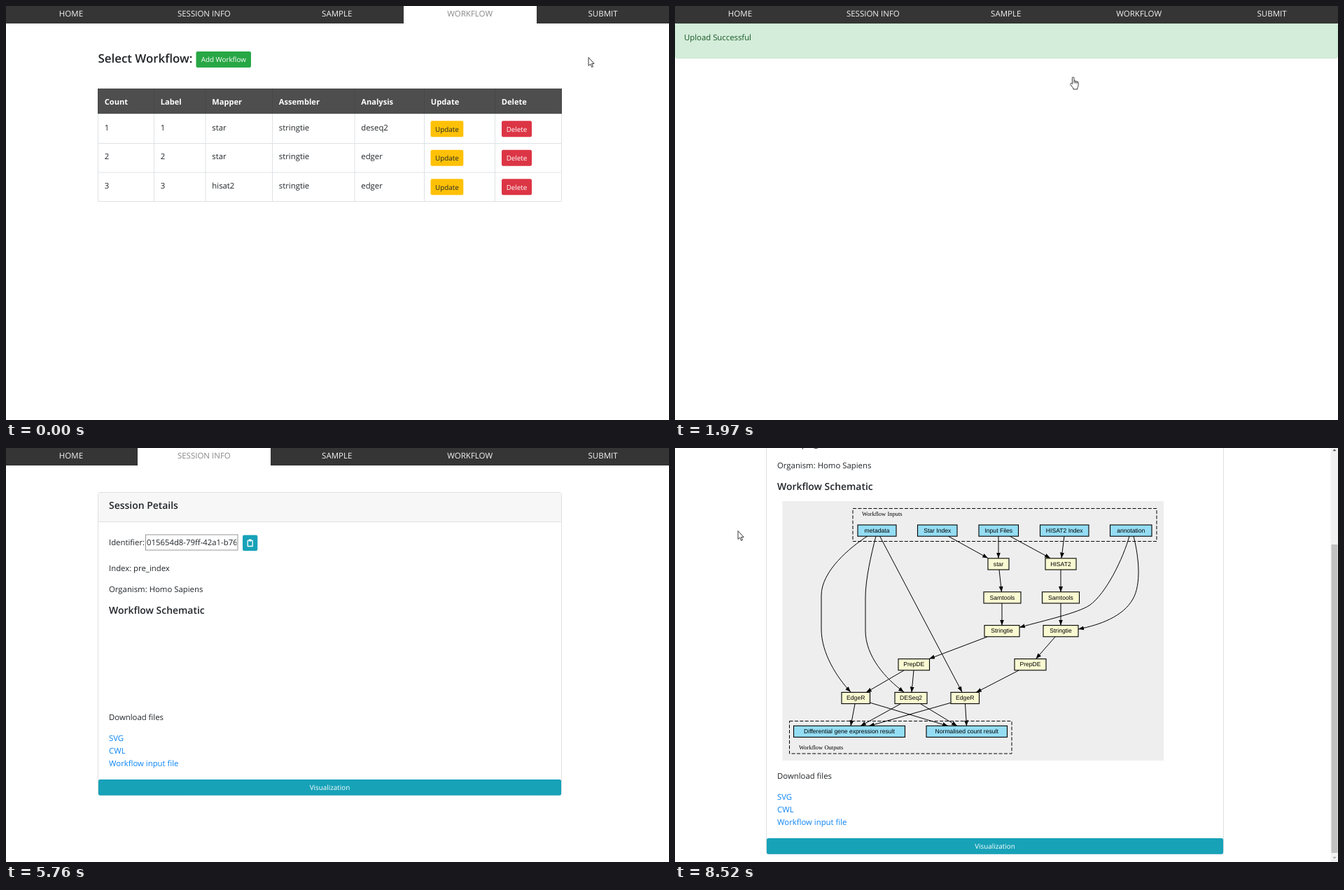
An HTML page that plays this animation: 947 by 592 pixels, repeating every 9210 ms.

```html
<!DOCTYPE html>
<html lang="en">
<head>
<meta charset="utf-8">
<title>Workflow session</title>
<style>
html, body { margin: 0; width: 100%; height: 100%; overflow: hidden; background: #fff; }
svg { display: block; }
#stage { width: 947px; height: 592px; }
text { font: 11.35px "Open Sans", "Noto Sans", sans-serif; fill: #212529; white-space: pre; text-rendering: geometricPrecision; }
.mid { text-anchor: middle; }
.caps { font-size: 11.5px; fill: #f4f4f4; }
.on { fill: #888; }
.white { fill: #fff; }
.small { font-size: 9.85px; }
.bold { font-size: 11.1px; font-weight: 700; }
.h3 { font-size: 19.6px; font-weight: 600; }
.h4 { font-size: 16.9px; font-weight: 600; }
.h5 { font-size: 13.95px; font-weight: 600; }
.link { fill: #0a84f5; }
.ok { fill: #155724; }
.node { font: 8.6px "Liberation Sans", Arial, sans-serif; fill: #000; }
.serif { font: 8.5px "Liberation Serif", Times, serif; fill: #000; }
.edges { fill: none; stroke: #000; stroke-width: 1; }
.page { display: none; }
</style>
</head>
<body>
<svg id="stage" viewBox="0 0 947 592" xmlns="http://www.w3.org/2000/svg">
  <defs>
    <marker id="tip" markerUnits="userSpaceOnUse" markerWidth="9" markerHeight="7" refX="8" refY="3" orient="auto">
      <path d="M0 0L8 3L0 6Z"/>
    </marker>
  </defs>
  <g id="pages"></g>
  <g id="cursor">
    <path id="arrow" d="M.5 .5V12.4L3.2 10L5.2 14.4L7 13.6L5.1 9.4H8.6Z" fill="#fff" stroke="#222" stroke-width=".9"/>
    <path id="hand" d="M3.4 10.6V2.2Q3.5 .6 4.7 .6T6 2.2V6.2Q7.2 5.4 8.2 6.6Q9.4 6 10.2 7.2Q12 6.8 12.1 8.6V12.2Q12 14.6 10.8 16V18H4.8V16.4L1 11.6Q.2 10 1.4 9.6T3.4 10.6M6 6.2V9.4M8.2 6.8V9.6M10.2 7.3V9.8" fill="#fff" stroke="#222" stroke-width=".9"/>
  </g>
</svg>
<script>
const LOOP = 9210, FULL = 947, NARROW = 936.5, ALERT = 48.7, MAX_SCROLL = 177, GRAPH_H = 261;
const $ = id => document.getElementById(id);

const text = (x, y, s, cls = '') => `<text x="${x}" y="${y}" class="${cls}">${s}</text>`;
const rect = (x, y, x2, y2, fill, more = '') =>
  `<rect x="${x}" y="${y}" width="${x2 - x}" height="${y2 - y}" fill="${fill}" ${more}/>`;
const button = (x, y, x2, y2, fill, label, cls = 'white') =>
  rect(x, y, x2, y2, fill, 'rx="2.2"') + text((x + x2) / 2, y + 15.3, label, 'small mid ' + cls);
const page = (id, body) => `<g class="page" id="${id}">${body}</g>`;

function nav(active, width = FULL) {
  const step = (width + 2.5) / 5;
  return rect(0, 0, width, 25, '#353535') +
    ['HOME', 'SESSION INFO', 'SAMPLE', 'WORKFLOW', 'SUBMIT'].map((name, i) => {
      const x = i * step - 2, on = i === active;
      return (on ? rect(Math.round(x), 0, Math.min(width, Math.round(x + step)), 25, '#fff') : '') +
        text(x + step / 2, 15, name, 'mid caps' + (on ? ' on' : ''));
    }).join('');
}

const notice = (width = FULL) =>
  rect(.5, 25.5, width - .5, 74.5, '#d4edda', 'stroke="#c3e6cb" rx="2.5"') +
  text(13, 49, 'Upload Successful', 'ok');

function workflows() {
  const cols = [131.5, 211.5, 285, 380.5, 498, 597.5, 698.5, 793.5];
  const rows = [118, 154.5, 196.5, 238, 279.5];
  const heads = ['Count', 'Label', 'Mapper', 'Assembler', 'Analysis', 'Update', 'Delete'];
  const data = [['1', '1', 'star', 'stringtie', 'deseq2'],
                ['2', '2', 'star', 'stringtie', 'edger'],
                ['3', '3', 'hisat2', 'stringtie', 'edger']];
  const lines = rows.slice(1).map(y => `M131.5 ${y}H793.5`).join('') +
    cols.map(x => `M${x} 154.5V279.5`).join('');
  return nav(3) + text(131.5, 80.5, 'Select Workflow:', 'h4') +
    button(271.5, 65, 350, 88, '#28a745', 'Add Workflow') +
    rect(131.5, 118, 793.5, 154.5, '#4e4e4e') +
    `<path d="${cols.map(x => `M${x} 118V154.5`).join('')}" stroke="#464646"/>` +
    `<path d="${lines}" stroke="#dee2e6"/>` +
    heads.map((s, i) => text(cols[i] + 9.3, 140.7, s, 'bold white')).join('') +
    data.map((row, r) => {
      const y = 164.3 + r * 41.5;
      return row.map((s, i) => text(cols[i] + 9.3, y + 13.5, s)).join('') +
        button(606.5, y, 653.3, y + 23, '#ffc107', 'Update', '') +
        button(708, y, 751, y + 23, '#dc3545', 'Delete');
    }).join('');
}

const submitButton = (dy, focus) =>
  rect(132, 80.7 + dy, 794, 120.8 + dy, '#4caf50') +
  (focus ? rect(131.5, 80.5, 794, 121, 'none', 'stroke="#4aa3b8"') : '') +
  text(463, 105 + dy, 'SUBMIT FOR ANALYSIS', 'mid caps white');

const spinner = (x, y) =>
  `<circle class="spin" data-x="${x}" data-y="${y}" cx="${x}" cy="${y}" r="10.5" fill="none" stroke="#212529" ` +
  `stroke-width="3" pathLength="360" stroke-dasharray="0 45 270 45"/>`;

const downloads = (x, dy) => text(x, 389 + dy, 'Download files') +
  ['SVG', 'CWL', 'Workflow input file'].map((s, i) => text(x, 419 + dy + i * 17.8, s, 'link')).join('');

function session(bar, alert, mode) {
  const width = bar ? NARROW : FULL;
  const l = bar ? 130.5 : 131.5, r = bar ? 783.5 : 793.5, x = l + 15.5;
  const busy = mode === 'busy', dy = mode === 'graph' ? GRAPH_H : 0;
  const bottom = busy ? 554.5 : 496.5 + dy;
  const body = rect(l, 63.5, r, bottom, '#fff', 'stroke="#dfdfdf" rx="3"') +
    rect(l + .5, 64, r - .5, 105, '#f7f7f7', 'rx="2"') + rect(l, 105, r, 106, '#dfdfdf') +
    text(x, 87, 'Session Petails', 'h5') +
    text(x, 139.3, 'Identifier:') +
    rect(x + 52.5, 124, x + 184, 146, '#fff', 'stroke="#8c8c8c" stroke-width=".9"') +
    `<svg x="${x + 53}" y="124" width="129.5" height="22">${text(1, 15, '015654d8-79ff-42a1-b76c')}</svg>` +
    rect(x + 191, 124.5, x + 212.3, 147, '#17a2b8', 'rx="2.2"') +
    `<path d="M${x + 198.2} 132.3h7v8.2h-7z" fill="none" stroke="#fff" stroke-width="1.3" stroke-linejoin="round"/>` +
    rect(x + 199.6, 130.6, x + 203.8, 133.6, '#fff', 'rx=".8"') +
    text(x, 176, 'Index: pre_index') + text(x, 206, 'Organism: Homo Sapiens') +
    (busy
      ? text(x, 235.5, 'no_svg') + text(x, 260.3, 'workflow being generated', 'h3') +
        spinner((l + r) / 2, 356.3)
      : text(x, 236.5, 'Workflow Schematic', 'h5') + downloads(x, dy) + (dy ? graph() : '') +
        button(l + .5, 474 + dy, r - .5, 496.7 + dy, '#17a2b8', 'Visualization'));
  return nav(1, width) + (alert ? notice(width) : '') +
    `<g transform="translate(0 ${alert ? ALERT : 0})">${body}</g>`;
}

function graph() {
  const blue = '#94ddf4', cream = '#fafad2';
  const node = (label, x, x2, y, fill = cream) =>
    rect(x, y, x2, y + 16.2, fill, 'stroke="#000" stroke-width="1.1"') + text((x + x2) / 2, y + 10.7, label, 'node mid');
  const frame = (x, y, x2, y2) => rect(x, y, x2, y2, 'none', 'stroke="#000" stroke-dasharray="5 2.4"');
  const edges = [
    'M275 303C250 319 209 353 209 388V436C209 470 231 505 251 526',
    'M287 303C280 330 272 365 272 391V438C272 475 301 507 327 526',
    'M292.5 303L410 526', 'M390 303L447 334.5', 'M462 303V334.5', 'M478 303L536 334.5',
    'M556 303L552 334.5', 'M463 351L466.5 383', 'M551 351V383', 'M467 399V430.5', 'M551 399V430.5',
    'M649 303C640 335 616 385 592 402C575 413 530 423 492 433.5',
    'M655 303C663 335 666 372 654 393C640 418 607 430 576 436',
    'M446 447L363 478.5', 'M543 447L515.5 478.5', 'M327 495L273 526.5', 'M341 495L338 526.5',
    'M491 495L430 526.5', 'M257 543L251 574.5', 'M278 541L390 574.5', 'M322 543L265 574.5',
    'M351 543L403 574.5', 'M395 541L277 574.5', 'M414.5 543L416.5 574.5'
  ];
  return rect(153.5, 253, 698, 624, '#eee') +
    frame(254, 263.5, 688, 310.5) + frame(163.5, 567.5, 481, 614) +
    text(267, 274, 'Workflow Inputs', 'serif') + text(177, 608, 'Workflow Outputs', 'serif') +
    `<g class="edges">${edges.map(d => `<path d="${d}" marker-end="url(#tip)"/>`).join('')}</g>` +
    node('metadata', 261, 316, 287, blue) + node('Star Index', 346.5, 403, 287, blue) +
    node('Input Files', 434, 490.5, 287, blue) + node('HISAT2 Index', 521.5, 591, 287, blue) +
    node('annotation', 621.5, 681, 287, blue) +
    node('star', 447, 477, 334.8) + node('HISAT2', 529, 573, 334.8) +
    node('Samtools', 441, 494, 382.8) + node('Samtools', 524.5, 577.5, 382.8) +
    node('Stringtie', 442, 492, 430.6) + node('Stringtie', 526, 576, 430.6) +
    node('PrepDE', 319, 363.5, 478.6) + node('PrepDE', 485, 530, 478.6) +
    node('EdgeR', 238, 278.5, 526.4) + node('DESeq2', 314, 360, 526.4) + node('EdgeR', 394, 434.5, 526.4) +
    node('Differential gene expression result', 169.5, 328.5, 574.3, blue) +
    node('Normalised count result', 359, 474.5, 574.3, blue);
}

const scrollbar = height => rect(NARROW, 0, FULL, 592, '#f1f1f1') +
  '<path class="up" d="M939.5 4.2L942 1.4L944.5 4.2Z"/><path class="down" d="M939.5 584.8H944.5L942 587.6Z"/>' +
  rect(937.5, 8, 946.5, 8 + height, '#c1c1c1', 'class="thumb"');

$('pages').innerHTML =
  page('flows', workflows()) +
  page('submit', nav(4) + submitButton(0)) +
  page('focus', nav(4) + submitButton(0, true)) +
  page('sent', nav(-1) + notice()) +
  page('done', nav(4) + notice() + submitButton(ALERT)) +
  page('first', session(true, true, 'busy') + scrollbar(550)) +
  page('busy', session(false, false, 'busy')) +
  page('ready', session(false, false, 'ready')) +
  page('graph', `<g id="scroller">${session(true, false, 'graph')}</g>` + scrollbar(441));

// time, page, pointer, x, y, scroll
const beats = [
  [0, 'flows', 'arrow', 831.5, 73], [100, 'flows', 'arrow', 829, 48], [210, 'flows', 'hand', 823, 12],
  [320, 'submit', 'hand', 822, 9], [440, 'submit', 'hand', 822, 9],
  [770, 'submit', 'arrow', 795, 30], [880, 'submit', 'arrow', 725, 61], [990, 'submit', 'hand', 640, 88],
  [1100, 'submit', 'hand', 585, 99], [1210, 'submit', 'hand', 564, 101],
  [1540, 'focus', 'hand', 564, 101], [1970, 'sent', 'hand', 564, 101], [2320, 'done', 'hand', 564, 101],
  [2740, 'done', 'arrow', 368, 72], [3050, 'done', 'arrow', 298, 26], [3170, 'done', 'hand', 290, 7],
  [3280, 'done', 'hand', 290, 5], [3390, 'first'], [3500, 'first'],
  [3820, 'first'], [3930, 'first'], [4040, 'first'], [4150, 'first'], [4260, 'first'],
  [4600, 'first'], [4710, 'first'], [4820, 'busy'], [4930, 'busy'], [5040, 'busy'],
  [5340, 'busy'], [5450, 'busy'], [5550, 'busy'], [5660, 'busy'], [5760, 'ready'],
  [6090, 'graph', 'arrow', 86.5, 38], [7190, 'graph', 'arrow', 86.5, 30.5], [7290, 'graph', 'arrow', 86.5, 45],
  [7630, 'graph', 'arrow', 89.5, 118], [7840, 'graph', 'arrow', 89.5, 118, 50],
  [7980, 'graph', 'arrow', 89.5, 118, 92], [8060, 'graph', 'arrow', 89.5, 118, 100],
  [8400, 'graph', 'arrow', 89.5, 118, 140], [8520, 'graph', 'arrow', 89.5, 118, MAX_SCROLL]
];

const shades = ['#a3a3a3', '#505050'];
const pages = document.querySelectorAll('.page'), spins = document.querySelectorAll('.spin');
let shown = null;

function show([time, name, pointer, x = 0, y = 0, scroll = 0]) {
  pages.forEach(p => p.style.display = p.id === name ? 'inline' : 'none');
  $('arrow').style.display = pointer === 'arrow' ? 'inline' : 'none';
  $('hand').style.display = pointer === 'hand' ? 'inline' : 'none';
  $('cursor').setAttribute('transform', `translate(${x} ${y})`);
  const angle = 190 + (time - 4260) * .48;
  spins.forEach(s => s.setAttribute('transform', `rotate(${angle} ${s.dataset.x} ${s.dataset.y})`));
  $('scroller').setAttribute('transform', `translate(0 ${-scroll})`);
  $('graph').querySelector('.thumb').setAttribute('y', 8 + scroll * 130 / MAX_SCROLL);
  document.querySelectorAll('.up').forEach(a => a.setAttribute('fill', shades[+(scroll > 0)]));
  document.querySelectorAll('.down').forEach(a => a.setAttribute('fill', shades[+(scroll < MAX_SCROLL)]));
}

let start = null;
function tick(now) {
  if (start === null) start = now;
  const t = Math.max(0, now - start) % LOOP;
  const beat = beats.findLast(b => b[0] <= t);
  if (beat !== shown) show(shown = beat);
  requestAnimationFrame(tick);
}
show(shown = beats[0]);
requestAnimationFrame(tick);
</script>
</body>
</html>
```
